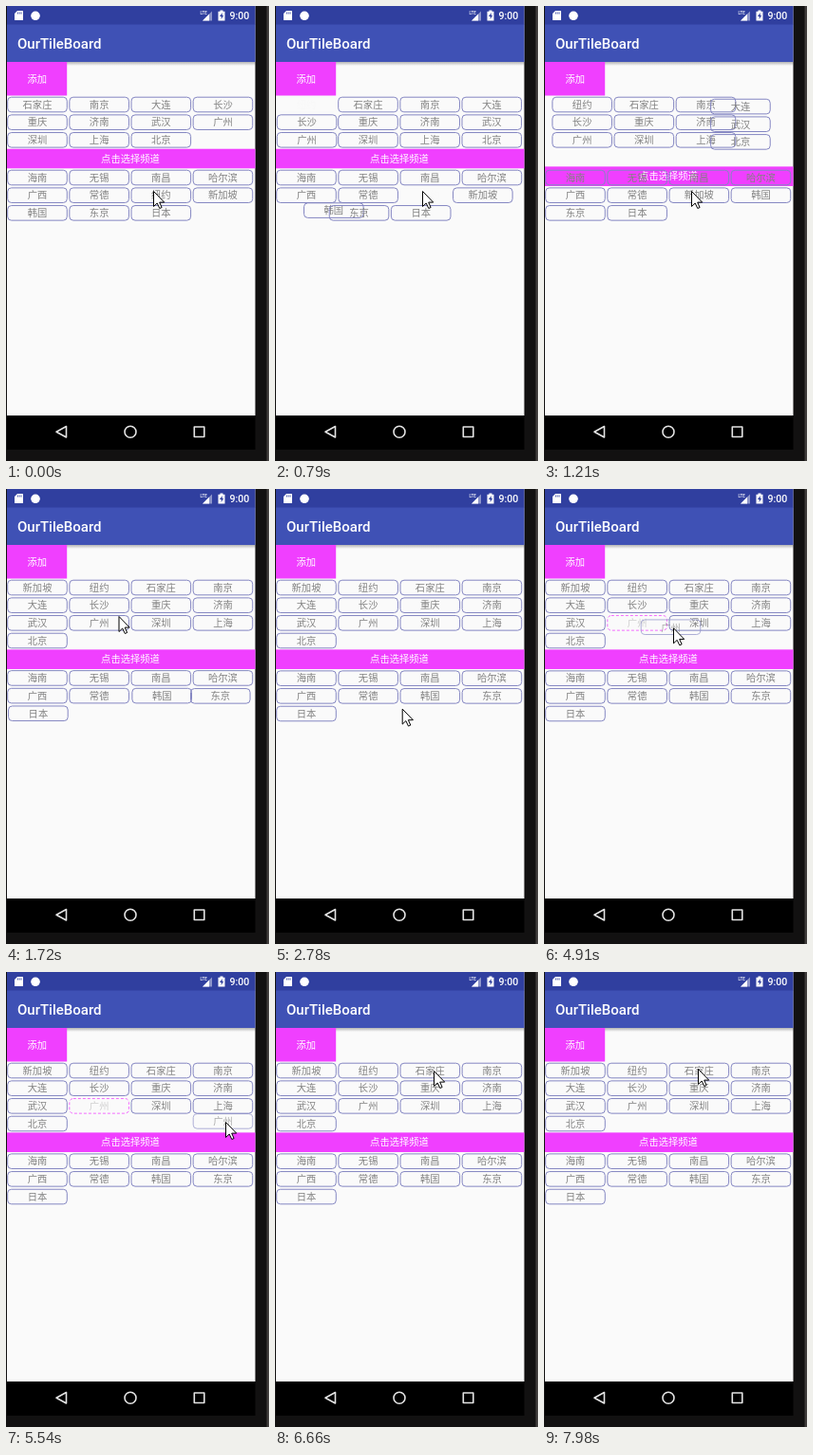
These frames come from a looping animation (277x480 px, 8000 ms). An HTML page:

```html
<!DOCTYPE html>
<html lang="zh">
<head>
<meta charset="utf-8">
<title>Tile board</title>
<style>
  html, body { margin: 0; width: 100%; height: 100%; overflow: hidden; background: #111; }
  svg { display: block; width: 100%; height: 100%; }
  text { font-family: "Noto Sans CJK SC", "Noto Sans CJK", sans-serif; font-size: 10.3px; text-anchor: middle; }
  .latin { font-family: Roboto, sans-serif; font-weight: 500; text-anchor: start; fill: #fff; }
  .label { fill: #fff; font-weight: 500; }
  .chip rect { fill: none; stroke: #8486c2; }
  .chip text { fill: #818181; }
  .held rect { stroke: #f36cff; stroke-dasharray: 3 2; }
  .held text { fill: #cfcfcf; }
</style>
</head>
<body>
<svg id="stage" viewBox="0 0 277 480" preserveAspectRatio="none">
  <defs>
    <linearGradient id="shade" x2="0" y2="1">
      <stop stop-color="#000" stop-opacity=".28"/>
      <stop offset="1" stop-color="#000" stop-opacity="0"/>
    </linearGradient>
  </defs>
  <rect width="277" height="480" fill="#121111"/>
  <rect x="274.5" width="2.5" height="480" fill="#3f3c3b"/>
  <rect x="1" width="261.5" height="432" fill="#fafafa"/>
  <rect x="1" y="59" width="261.5" height="4" fill="url(#shade)"/>
  <rect x="1" y="19" width="261.5" height="40" fill="#3f51b5"/>
  <rect x="1" width="261.5" height="19.5" fill="#303f9f"/>
  <rect x="1" y="432" width="261.5" height="36" fill="#000"/>

  <g fill="#fff">
    <path d="M12 5h5.500q.5 0 .5.500v9q0 .5-.5.500h-8q-.5 0-.5-.5V8z"/>
    <path d="M12.500 6.500v2M14.300 6.500v2M16.100 6.500v2" stroke="#303f9f" stroke-width=".8"/>
    <circle cx="31" cy="10.300" r="4.800"/>
    <path d="M207 15.500h10V5.500z" opacity=".45"/>
    <path d="M207 15.500h7V8.500z"/>
    <path d="M225.500 4.500h3v1.200h2v9.800h-7V5.700h2z"/>
    <path d="M227.700 7l-2.700 4h1.700v3l2.500-4.200h-1.600z" fill="#303f9f"/>
  </g>
  <text class="latin" x="204.500" y="9" style="font-size:4.500px">LTE</text>
  <text class="latin" x="235.500" y="14.200" style="font-size:10.600px">9:00</text>
  <text class="latin" x="12" y="45.300" style="font-size:15px">OurTileBoard</text>

  <rect x="1" y="59" width="63.200" height="35.500" fill="#f03fff"/>
  <text class="label" x="32.700" y="80.800">添加</text>
  <g id="header">
    <rect x="1" width="261.500" height="20.600" fill="#f03fff"/>
    <text class="label" x="131" y="14">点击选择频道</text>
  </g>
  <g id="chips"></g>

  <g fill="none" stroke="#e4e4e4" stroke-width="1.600" stroke-linejoin="round">
    <path d="M53 449.200L63.500 443.500V455z"/>
    <circle cx="131" cy="449.200" r="6"/>
    <rect x="198.300" y="444" width="10.500" height="10.500"/>
  </g>
  <path id="cursor" d="M.5.5V16.500L4.200 13 6.800 18.500 9.100 17.500 6.700 12.100H11.700z" fill="#fff" stroke="#000"/>
</svg>
<script>
const LOOP = 8000, PHASE = 300, DELAY = 262;
const CLICKS = [505, 1193];
const DRAG = { name: '广州', start: 4790, lift: 4910, end: 5840 };
const COL = 65.15, ROW = 18.67, TOP_Y = 104, SECTION_Y = 94.8;

// Screen refreshes: [first time, count], 120 ms apart inside a burst
const BURSTS = [[520, 2], [790, 1], [940, 2], [1210, 3], [1600, 4], [2390, 2], [2660, 3],
  [3180, 1], [3330, 3], [3720, 2], [3990, 2], [4260, 1], [4790, 3], [5180, 4], [5840, 3],
  [6230, 2], [6660, 3], [7050, 2], [7320, 1], [7470, 4], [7980, 1]];
const TICKS = [0, ...BURSTS.flatMap(([t, n]) => Array.from({ length: n }, (_, i) => t + i * 120))];

// Pointer path: time, x, y
const PATH = [[0, 155, 195], [1330, 155, 195], [1720, 118.5, 134], [1840, 113, 135],
  [1960, 112, 136], [2270, 112, 136], [2510, 142, 188], [2900, 130, 251], [3180, 119, 224],
  [3450, 91, 176], [3570, 97, 184], [3840, 93, 195], [3990, 100, 185], [4110, 91, 152],
  [4260, 86, 139], [4670, 86, 139], [5030, 161, 150], [5540, 231, 158], [5840, 222, 152],
  [6080, 189, 125], [6350, 166, 102], [6660, 167, 104], [6900, 173, 122], [7170, 156, 155],
  [7320, 153, 158], [7590, 146, 167], [7830, 162, 105], [7980, 162, 102]];

const picked = ['纽约', '新加坡'];
const tops = ['石家庄 南京 大连 长沙 重庆 济南 武汉 广州 深圳 上海 北京'.split(' ')];
const lows = ['海南 无锡 南昌 哈尔滨 广西 常德 纽约 新加坡 韩国 东京 日本'.split(' ')];
picked.forEach((name, i) => {
  tops.push([name, ...tops[i]]);
  lows.push(lows[i].filter(n => n !== name));
});

const $ = id => document.getElementById(id);
const lerp = (a, b, p) => a + (b - a) * p;
const progress = (t, start) => Math.min(1, Math.max(0, (t - start) / PHASE));
const decelerate = p => 1 - (1 - p) ** 2;
const smooth = p => (1 - Math.cos(Math.PI * p)) / 2;
const move = (el, x, y) => el.setAttribute('transform', `translate(${x.toFixed(2)} ${y.toFixed(2)})`);

function makeChip(name) {
  const g = document.createElementNS('http://www.w3.org/2000/svg', 'g');
  g.setAttribute('class', 'chip');
  g.innerHTML = `<rect x="-31.3" y="-7.8" width="62.6" height="15.6" rx="4"/><text y="3.8">${name}</text>`;
  $('chips').append(g);
  return g;
}
const makeAll = names => Object.fromEntries(names.map(n => [n, makeChip(n)]));
const topChips = makeAll(tops[2]);
const lowChips = makeAll(lows[0]);
const ghost = makeChip(DRAG.name);

const spot = (i, y) => [33 + (i % 4) * COL, y + Math.floor(i / 4) * ROW];
const sectionY = names => SECTION_Y + Math.ceil(names.length / 4) * ROW;

function layout(chips, before, after, y0, y1, shift, fadeIn, fadeOut) {
  for (const name in chips) {
    const a = before.indexOf(name), b = after.indexOf(name);
    const from = spot(a < 0 ? b : a, a < 0 ? y1 : y0);
    const to = spot(b < 0 ? a : b, b < 0 ? y0 : y1);
    const alpha = a < 0 ? (b < 0 ? 0 : fadeIn) : b < 0 ? 1 - fadeOut : 1;
    chips[name].setAttribute('opacity', alpha);
    if (a >= 0 || b >= 0) move(chips[name], lerp(from[0], to[0], shift), lerp(from[1], to[1], shift));
  }
}

function pointer(t) {
  const i = PATH.findIndex(k => k[0] > t);
  if (i < 0) return PATH[PATH.length - 1].slice(1);
  const [t0, x0, y0] = PATH[i - 1], [t1, x1, y1] = PATH[i];
  const p = (t - t0) / (t1 - t0);
  return [lerp(x0, x1, p), lerp(y0, y1, p)];
}

function draw(time) {
  const t = TICKS.findLast(k => k <= time);
  const step = CLICKS.filter(c => c <= t).length, prev = Math.max(0, step - 1);
  const start = step ? CLICKS[prev] : LOOP;
  const first = progress(t, start), second = progress(t, start + DELAY);

  const oldY = sectionY(tops[prev]), newY = sectionY(tops[step]);
  const inset = 29.9 + TOP_Y - SECTION_Y - 8.9;
  move($('header'), 0, newY - 0.1);
  layout(topChips, tops[prev], tops[step], TOP_Y, TOP_Y, decelerate(first), smooth(second), 0);
  layout(lowChips, lows[prev], lows[step], oldY + inset, newY + inset,
    decelerate(second), 0, smooth(first));

  const [x, y] = pointer(t);
  move($('cursor'), x, y);
  topChips[DRAG.name].classList.toggle('held', t >= DRAG.start && t < DRAG.end);
  ghost.setAttribute('opacity', t >= DRAG.lift && t < DRAG.end ? 0.65 : 0);
  move(ghost, x - 2.5, y - 0.6);
}

const begin = performance.now();
function frame() {
  draw((performance.now() - begin) % LOOP);
  requestAnimationFrame(frame);
}
frame();
</script>
</body>
</html>
```
